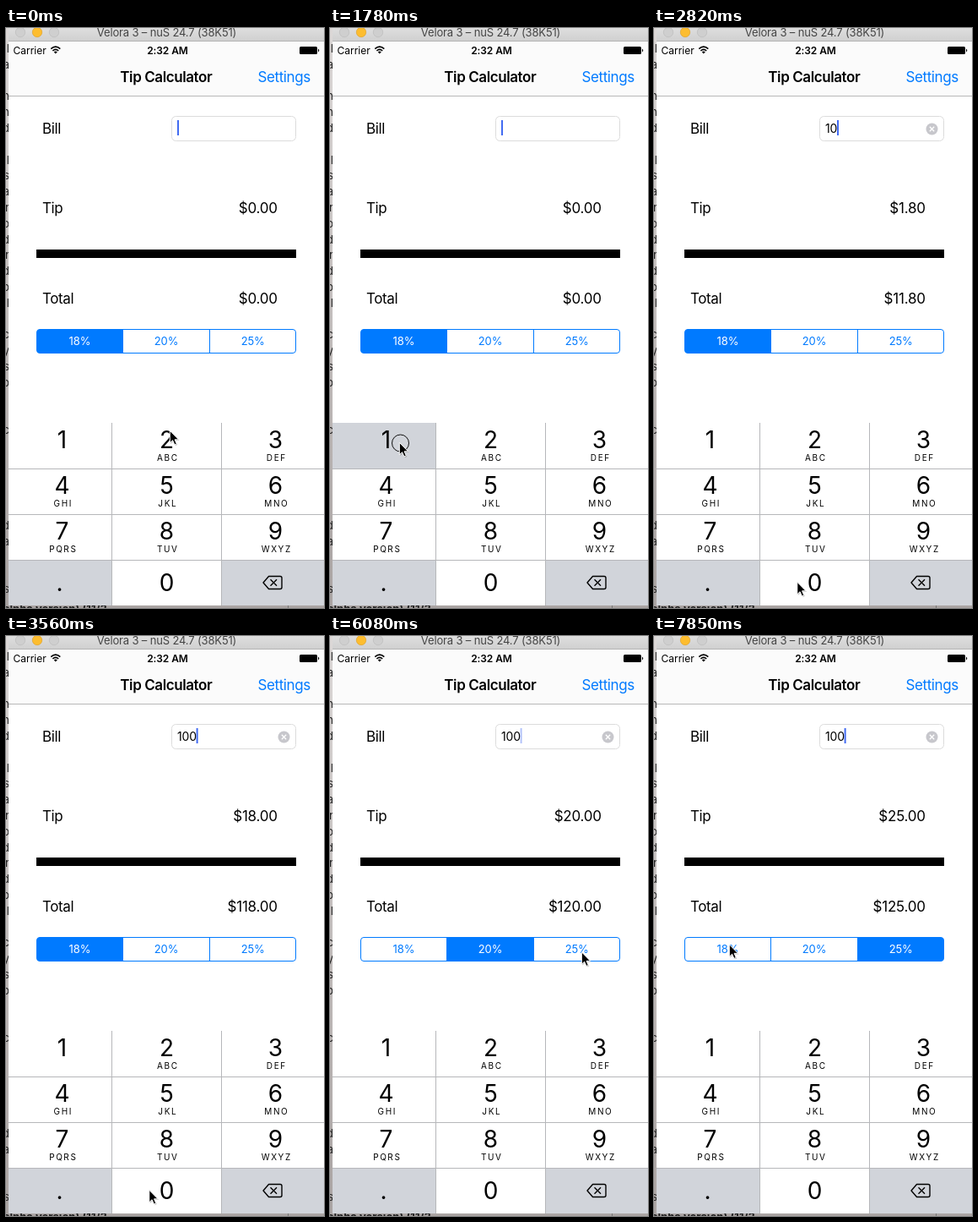
Write an HTML page that moves like this. It is 377x686 px and loops after 8 s.

```html
<!DOCTYPE html>
<html lang="en">
<head>
<meta charset="utf-8">
<title>Tip Calculator</title>
<style>
html, body { margin: 0; width: 100%; height: 100%; overflow: hidden; background: #fff; }
svg { display: block; width: 377px; height: 686px; font-family: Inter, "Open Sans", sans-serif; }
.body { font-size: 17px; letter-spacing: -.41px; }
.mid { text-anchor: middle; }
.end { text-anchor: end; }
.money { text-anchor: end; letter-spacing: -.22px; }
.digit { font-size: 28px; text-anchor: middle; }
.letters { font-size: 10px; letter-spacing: 1.6px; text-anchor: middle; }
.seg { font-size: 13px; letter-spacing: -.1px; text-anchor: middle; }
</style>
</head>
<body>
<svg viewBox="0 0 377 686">
  <defs>
    <linearGradient id="desk" x2="0" y2="1">
      <stop offset="0" stop-color="#dcd8d7"/><stop offset="1" stop-color="#aaa4a3"/>
    </linearGradient>
    <linearGradient id="bar" x2="0" y2="1">
      <stop offset="0" stop-color="#dedede"/><stop offset="1" stop-color="#d0d0d0"/>
    </linearGradient>
    <clipPath id="segClip"><rect x="36.5" y="356.5" width="307" height="28" rx="3.5"/></clipPath>
  </defs>

  <rect width="377" height="686" fill="url(#desk)"/>
  <g id="scraps" font-size="13" class="end" fill="#222"></g>
  <text x="-3" y="692" font-size="13" font-weight="700" fill="#222">alpha version) (11/3</text>
  <path d="M334.5 683V686" stroke="#777"/>

  <rect x="3" width="374" height="683" fill="#fff"/>
  <rect x="3" width="374" height="15" fill="url(#bar)"/>
  <path d="M3 15.5H377" stroke="#b4b4b4"/>
  <g stroke-width=".7">
    <circle cx="17" cy="5" r="5.7" fill="#cfcfcf" stroke="#bcbcbc"/>
    <circle cx="37" cy="5" r="5.7" fill="#fdbd2f" stroke="#e0a32a"/>
    <circle cx="57" cy="5" r="5.7" fill="#cfcfcf" stroke="#bcbcbc"/>
  </g>
  <text x="190.5" y="10" class="mid" font-size="13" letter-spacing="-.15" fill="#444">Velora 3 – nuS 24.7 (38K51)</text>

  <rect x="3" y="16" width="374" height="64" fill="#fbfbfb"/>
  <path d="M3 80.5H377" stroke="#b8b8b8"/>
  <text x="8.5" y="31" font-size="12">Carrier</text>
  <g fill="none" stroke="#000" stroke-width="1.7">
    <path d="M53.3 24.6Q58.8 19.6 64.3 24.6M55.4 27Q58.8 23.8 62.2 27"/>
    <path d="M56.8 28.3Q58.8 26.6 60.8 28.3L58.8 30.6Z" fill="#000" stroke="none"/>
  </g>
  <text x="191.5" y="31" class="mid" font-size="12" font-weight="600" letter-spacing="-.1">2:32 AM</text>
  <rect x="348" y="22" width="21" height="9" rx="1.5"/>
  <path d="M370 24.5Q372.5 26.5 370 28.5Z"/>
  <text x="189.8" y="64" class="body mid" font-weight="600">Tip Calculator</text>
  <text x="298.5" y="64" class="body" fill="#007aff">Settings</text>

  <g class="body">
    <text x="43" y="125">Bill</text>
    <text x="43" y="218.5">Tip</text>
    <text x="43" y="326">Total</text>
    <text id="tip" class="money" x="321.8" y="218.5"></text>
    <text id="total" class="money" x="321.8" y="326"></text>
  </g>
  <rect x="196.5" y="104.5" width="147" height="29" rx="5" fill="#fff" stroke="#dcdcdc"/>
  <text id="bill" x="203" y="124" font-size="14" letter-spacing="-.15"></text>
  <rect id="caret" y="109" width="2" height="18" fill="#426bf2"/>
  <g id="clear">
    <circle cx="329.5" cy="119.5" r="7" fill="#c7c7cc"/>
    <path d="M326.8 116.8L332.2 122.2M332.2 116.8L326.8 122.2" stroke="#fff" stroke-width="1.3"/>
  </g>
  <rect x="36" y="262" width="308" height="10"/>

  <g id="segments" clip-path="url(#segClip)"></g>
  <path d="M138.5 356V385M241.5 356V385" stroke="#007aff"/>
  <rect x="36.5" y="356.5" width="307" height="28" rx="3.5" fill="none" stroke="#007aff"/>

  <g id="keys"></g>
  <path d="M125.5 467V683M255.5 467V683M3 521.5H377M3 575.5H377M3 629.5H377" stroke="#b6b7ba"/>
  <path d="M311.5 648.5H325Q327 648.5 327 650.5V661.5Q327 663.5 325 663.5H311.5L305 656Z" fill="none" stroke="#000" stroke-width="1.4" stroke-linejoin="round"/>
  <path d="M313.5 652.3L321 659.8M321 652.3L313.5 659.8" stroke="#000" stroke-width="1.4"/>

  <circle id="touch" r="10" fill="none" stroke="#111"/>
  <g id="pointer">
    <path d="M1 1.2V15.7L4.3 12.6L6.6 17.8L9 16.8L6.8 11.7H11.3Z" opacity=".22"/>
    <path d="M0 0V14.5L3.3 11.4L5.6 16.6L8 15.6L5.8 10.5H10.3Z" stroke="#fff"/>
  </g>
</svg>
<script>
const LOOP = 8000, TICK = 148.24, GREY = "#d1d4da";
const $ = id => document.getElementById(id);

function add(parent, tag, attrs, text = "") {
  const el = document.createElementNS("http://www.w3.org/2000/svg", tag);
  for (const k in attrs) el.setAttribute(k, attrs[k]);
  el.textContent = text;
  parent.appendChild(el);
  return el;
}

// Slivers of the text window behind, at the left edge
let seed = 11;
const random = () => (seed = seed * 16807 % 2147483647) / 2147483647;
for (let y = 29; y < 680; y += 18.8) {
  if (random() < .7) add($("scraps"), "text", { x: 4, y }, "acdilnoprsy"[Math.floor(random() * 11)]);
}

// Keypad
const keys = {};
const letters = ["", "ABC", "DEF", "GHI", "JKL", "MNO", "PQRS", "TUV", "WXYZ"];
[..."123456789.0<"].forEach((key, i) => {
  const col = i % 3, top = 467 + 54 * Math.floor(i / 3);
  const left = col ? 130 * col - 4 : 3, mid = 66.5 + 126.5 * col - (col === 1 ? 2.5 : 0);
  keys[key] = add($("keys"), "rect", { x: left, y: top, width: 130, height: 54 });
  if (key === "<") return;
  add($("keys"), "text", { x: key === "." ? 63.5 : mid, y: top + (i < 9 ? 30 : 37), class: "digit" }, key);
  if (letters[i]) add($("keys"), "text", { x: mid + 1.3, y: top + 45, class: "letters" }, letters[i]);
});

// Rate selector
const rates = [18, 20, 25];
const segments = rates.map((rate, i) => ({
  box: add($("segments"), "rect", { x: 36 + 102.7 * i, y: 356, width: 102.7, height: 29, fill: "#007aff" }),
  label: add($("segments"), "text", { x: 87.5 + 102.6 * i, y: 375, class: "seg" }, rate + "%")
}));

// Stops of the pointer: it arrives one tick before each, and taps a key or a rate there
const stops = [
  { tick: -2, x: 194, y: 476 },
  { tick: 12, x: 82, y: 490, travel: 2, bend: 0, key: "1" },
  { tick: 18, x: 169.5, y: 655, travel: 4, bend: -18, key: "0" },
  { tick: 23, x: 169.5, y: 655, travel: 1, bend: 0, key: "0" },
  { tick: 34, x: 179, y: 363, travel: 6, bend: 45, rate: 1 },
  { tick: 42, x: 298, y: 373.5, travel: 5, bend: -31, rate: 2 },
  { tick: 54, x: 89, y: 364.5, travel: 7, bend: 16 }
];
const clamp = v => Math.min(1, Math.max(0, v));
const ease = p => p * p * (3 - 2 * p);
const money = v => "$" + v.toFixed(2);

function pointerAt(n) {
  let { x, y } = stops[0];
  for (const s of stops.slice(1)) {
    const p = ease(clamp((n - s.tick + 1 + s.travel) / s.travel));
    const dx = s.x - x, dy = s.y - y;
    const side = s.bend * Math.sin(Math.PI * p) / (Math.hypot(dx, dy) || 1);
    x += dx * p + dy * side;
    y += dy * p - dx * side;
    if (p < 1) break;
  }
  return [x, y];
}

// The caret stays lit after a key press, then pulses
function caretAt(n) {
  const press = stops.filter(s => s.tick <= n && s.rate === undefined).pop();
  const phase = Math.max(0, n - press.tick - 2.7) / 6.75;
  return clamp(.5 + .9 * Math.cos(2 * Math.PI * phase));
}

// How strongly each rate is filled: a faint tint while tapped, then a switch
function fillsAt(n) {
  const fills = [1, 0, 0];
  let current = 0;
  for (const { tick, rate } of stops) {
    if (!rate || tick > n) continue;
    const age = n - tick;
    fills[current] = age < 2 ? 1 - .1 * age : 0;
    fills[rate] = age < 2 ? .2 + .05 * age : 1;
    current = rate;
  }
  return fills;
}

function render(t) {
  const n = Math.floor((t + 12) / TICK);
  const done = stops.filter(s => s.tick < n);
  const bill = done.map(s => s.key || "").join("");
  const rate = done.reduce((r, s) => s.rate || r, 0);
  const tip = bill * rates[rate] / 100;
  $("bill").textContent = bill;
  $("tip").textContent = money(tip);
  $("total").textContent = money(+bill + tip);
  $("clear").setAttribute("visibility", bill ? "visible" : "hidden");
  $("caret").setAttribute("x", bill ? 199.8 + 8.6 * bill.length : 203);
  $("caret").setAttribute("opacity", caretAt(n));

  const tap = stops.find(s => (s.key && n === s.tick) || (s.rate && (n === s.tick || n === s.tick + 1)));
  for (const key in keys) {
    keys[key].setAttribute("fill", ".<".includes(key) || (tap && tap.key === key) ? GREY : "#fff");
  }
  fillsAt(n).forEach((w, i) => {
    segments[i].box.setAttribute("opacity", w);
    segments[i].label.setAttribute("fill", `rgb(${255 * w},${122 + 133 * w},255)`);
  });

  const [x, y] = pointerAt(n);
  $("pointer").setAttribute("transform", `translate(${x + .3} ${y + .3})`);
  $("touch").setAttribute("transform", `translate(${x + 1.5} ${y + 1})`);
  $("touch").setAttribute("visibility", tap ? "visible" : "hidden");
}

const start = performance.now();
function frame() {
  render((performance.now() - start) % LOOP);
  requestAnimationFrame(frame);
}
frame();
</script>
</body>
</html>
```
